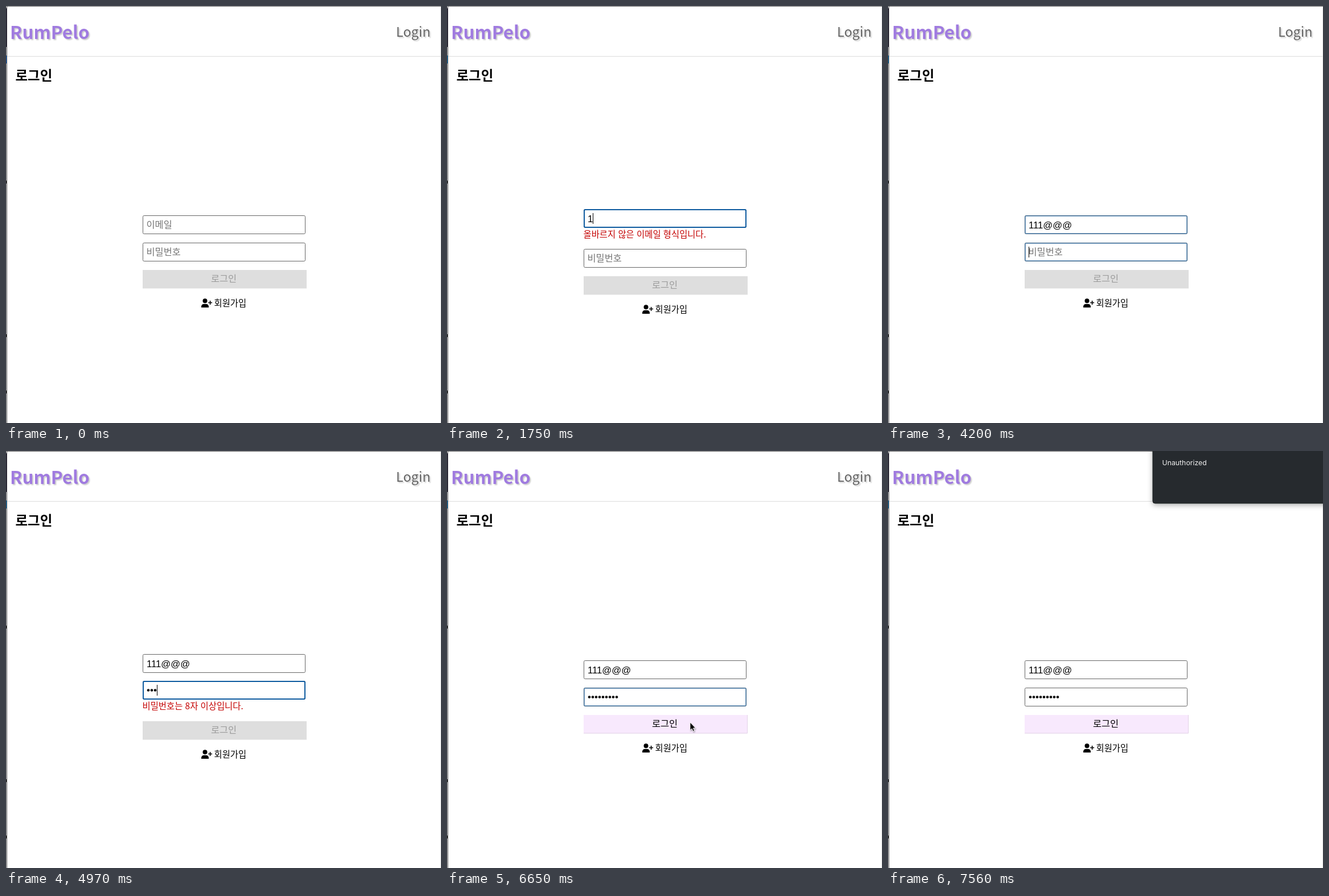
An HTML page for the animation above (8 s loop, 764x733 px).

```html
<!DOCTYPE html>
<html lang="ko">
<head>
<meta charset="utf-8">
<title>로그인</title>
<style>
  html, body { margin: 0; width: 100%; height: 100%; overflow: hidden; background: #fff; }
  svg { display: block; width: 764px; height: 733px; }
  text { font-family: "Noto Sans CJK KR", "Noto Sans CJK", "Noto Sans", sans-serif; font-size: 16.4px; white-space: pre; }
  .brand { font-size: 31.4px; font-weight: 700; fill: #a07be0; text-shadow: 2px 2px 2px #ccc; }
  .nav { font-size: 23.4px; font-weight: 500; fill: #666; text-shadow: 2px 2px 2px #ccc; }
  .heading { font-size: 23.5px; font-weight: 700; }
  .hint { fill: #757575; }
  .typed { font-family: "Liberation Sans", Arial, sans-serif; font-size: 16.7px; }
  .error { font-size: 15.4px; fill: #c40000; }
  .join { font-size: 15.4px; font-weight: 500; }
  .notice { font-family: Inter, sans-serif; font-size: 12.3px; fill: #eee; }
  .box { fill: #fff; stroke: #666; }
  .ring { fill: none; stroke: #0d5a9f; stroke-width: 2; }
</style>
</head>
<body>
<svg viewBox="0 0 764 733">
  <defs>
    <filter id="soft" x="-20%" y="-50%" width="140%" height="200%">
      <feDropShadow dx="0" dy="3" stdDeviation="5" flood-opacity=".3"/>
    </filter>
    <filter id="lift" x="-50%" y="-50%" width="220%" height="220%">
      <feDropShadow dx="1" dy="2" stdDeviation="1.2" flood-opacity=".35"/>
    </filter>
  </defs>

  <rect width="764" height="733" fill="#fff"/>
  <path d="M2 88.5H764" stroke="#ddd"/>
  <path d="M763.5 1V733" stroke="#e4e4e4"/>
  <path d="M0 .5H764" stroke="#666"/>
  <path d="M.5 0V733" stroke="#d4d4d8"/>
  <path d="M.5 4V72" stroke="#17132b"/>
  <path id="behind" d="M.5 87V101" stroke="#1463c8"/>
  <path d="M.5 307v5M.5 577v5M.5 676v5" stroke="#222"/>
  <path d="M1.5 0V733" stroke="#444"/>

  <text class="brand" x="7" y="57.5">RumPelo</text>
  <text class="nav" x="685" y="54">Login</text>
  <text class="heading" x="16.5" y="130.5">로그인</text>

  <g id="email">
    <rect class="box" x="240.5" y=".5" width="285" height="32" rx="2"/>
    <rect class="ring" x="241" y="1" width="284" height="31" rx="2"/>
    <text class="hint" x="246.5" y="21.5">이메일</text>
    <text class="typed" x="247" y="22.5"></text>
    <text class="error" x="239.5" y="50">올바르지 않은 이메일 형식입니다.</text>
  </g>

  <g id="password">
    <rect class="box" x="240.5" y=".5" width="285" height="32" rx="2"/>
    <rect class="ring" x="241" y="1" width="284" height="31" rx="2"/>
    <text class="hint" x="246.5" y="21.5">비밀번호</text>
    <g class="dots"></g>
    <text class="error" x="239.5" y="50">비밀번호는 8자 이상입니다.</text>
  </g>

  <path id="caret" d="M.5 7V26" stroke="#000"/>

  <g id="actions">
    <rect id="button" x="240" width="288" height="32.5"/>
    <path id="edge" d="M527.5 0V32H240" fill="none" stroke="#e2d3e7"/>
    <text id="label" x="382.5" y="20.5" text-anchor="middle">로그인</text>
    <circle cx="349.5" cy="54.3" r="4"/>
    <path d="M343 66V64.5C343 61.5 345 59.8 348 59.8H351C354 59.8 356 61.5 356 64.5V66Z"/>
    <path d="M358.6 54V61M355.1 57.5H362.1" stroke="#000" stroke-width="1.6"/>
    <text class="join" x="365.5" y="63.5">회원가입</text>
  </g>

  <g id="dialog">
    <rect x="465" y="-40" width="340" height="132" rx="4" fill="#282b2e" stroke="#1c1e20" filter="url(#soft)"/>
    <text class="notice" x="481.5" y="24.5">Unauthorized</text>
  </g>

  <path id="pointer" d="M0 0V13.6L3.1 10.9 5.2 15.6 7.5 14.6 5.4 10H9.4Z"
        stroke="#fff" stroke-width=".8" filter="url(#lift)"/>
</svg>
<script>
const LOOP = 8000, TICK = 70, FORM_TOP = 368, ERROR_HEIGHT = 23;

const emailKeys = [[1750, "1"], [1960, "1"], [2100, "1"], [3150, "@"], [3290, "@"], [3500, "@"]];
const dotTimes = [4550, 4760, 4970, 5110, 5320, 5460, 5600, 5740, 6090];
const caretResets = [1190, 1400, ...emailKeys.map(k => k[0]), 4200, ...dotTimes];
const pointerPath = [
  [5740, 446, 512], [5950, 430, 464], [6090, 431, 467],
  [6440, 427, 477], [7210, 427, 477], [7560, 740, 30]
];

const $ = s => document.querySelector(s);
const clamp = v => Math.max(0, Math.min(1, v));
const during = (t, from, to) => t >= from && t < to;
const show = (el, on) => el.setAttribute("opacity", +on);
const move = (el, x, y) => el.setAttribute("transform", `translate(${x} ${y})`);
const smooth = p => p * p * (3 - 2 * p);
const fadeIn = (t, start) => clamp((t - start + TICK) / (2 * TICK));

function field(id) {
  const part = name => $(`#${id} .${name}`);
  return { el: $("#" + id), ring: part("ring"), hint: part("hint"), error: part("error") };
}
const email = field("email"), password = field("password");
const typed = $(".typed"), dots = $(".dots"), caret = $("#caret"), pointer = $("#pointer");
const behind = $("#behind"), button = $("#button"), dialog = $("#dialog");

dotTimes.forEach((_, i) => {
  const dot = document.createElementNS("http://www.w3.org/2000/svg", "circle");
  dot.setAttribute("cx", 250 + 6 * i);
  dot.setAttribute("cy", 16.5);
  dot.setAttribute("r", 2.3);
  dots.append(dot);
});

function drawForm(t) {
  const text = emailKeys.filter(k => t >= k[0]).map(k => k[1]).join("");
  const dotCount = dotTimes.filter(k => t >= k).length;
  const emailError = text !== "" && !text.includes("@");
  const passwordError = dotCount > 0 && dotCount < 8;
  const shift = emailError || passwordError ? ERROR_HEIGHT / 2 : 0;

  const emailY = FORM_TOP + .5 - shift;
  const passwordY = FORM_TOP + 48 + (emailError ? shift : -shift);
  move(email.el, 0, Math.floor(emailY));
  move(password.el, 0, Math.floor(passwordY));
  move($("#actions"), 0, Math.floor(FORM_TOP + 96 + shift));

  show(email.hint, !text);
  show(email.error, emailError);
  show(email.ring, fadeIn(t, 1190) * (1 - fadeIn(t, 4200)));
  if (typed.textContent !== text) typed.textContent = text;

  show(password.hint, !dotCount);
  show(password.error, passwordError);
  show(password.ring, fadeIn(t, 4200) * (1 - fadeIn(t, 6650)));
  [...dots.children].forEach((dot, i) => show(dot, i < dotCount));

  const onEmail = t < 4200;
  const lastReset = Math.max(...caretResets.filter(k => k <= t), 0);
  const caretX = onEmail ? 247 + (text ? typed.getComputedTextLength() : 0) : 247 + 6 * dotCount;
  move(caret, Math.round(caretX), Math.floor(onEmail ? emailY : passwordY));
  show(caret, during(t, 1190, 6650) && (t - lastReset) % 1050 < 490);

  const enabled = dotCount > 8;
  button.setAttribute("fill", enabled ? "#f8e9fd" : "#dedede");
  $("#label").setAttribute("fill", enabled ? "#000" : "#9c9c9c");
  show($("#edge"), enabled);
}

function drawPointer(t) {
  const next = pointerPath.findIndex(p => p[0] > t);
  show(pointer, next > 0);
  if (next < 1) return;
  const [t0, x0, y0] = pointerPath[next - 1], [t1, x1, y1] = pointerPath[next];
  const p = smooth((t - t0) / (t1 - t0));
  move(pointer, x0 + (x1 - x0) * p, y0 + (y1 - y0) * p);
}

function drawDialog(t) {
  const rest = (1 - clamp((t - 7000) / 280)) ** 2;
  show(dialog, t >= 7000 ? 1 - .19 * rest : 0);
  move(dialog, 1.7 * rest, -4 * rest);
}

const start = performance.now();
function frame() {
  const elapsed = (performance.now() - start) % LOOP;
  const t = Math.floor(elapsed / TICK) * TICK;
  behind.setAttribute("stroke", t < 490 ? "#1463c8" : "#0b78c0");
  drawForm(t);
  drawDialog(t);
  drawPointer(t);
  requestAnimationFrame(frame);
}
frame();
</script>
</body>
</html>
```
